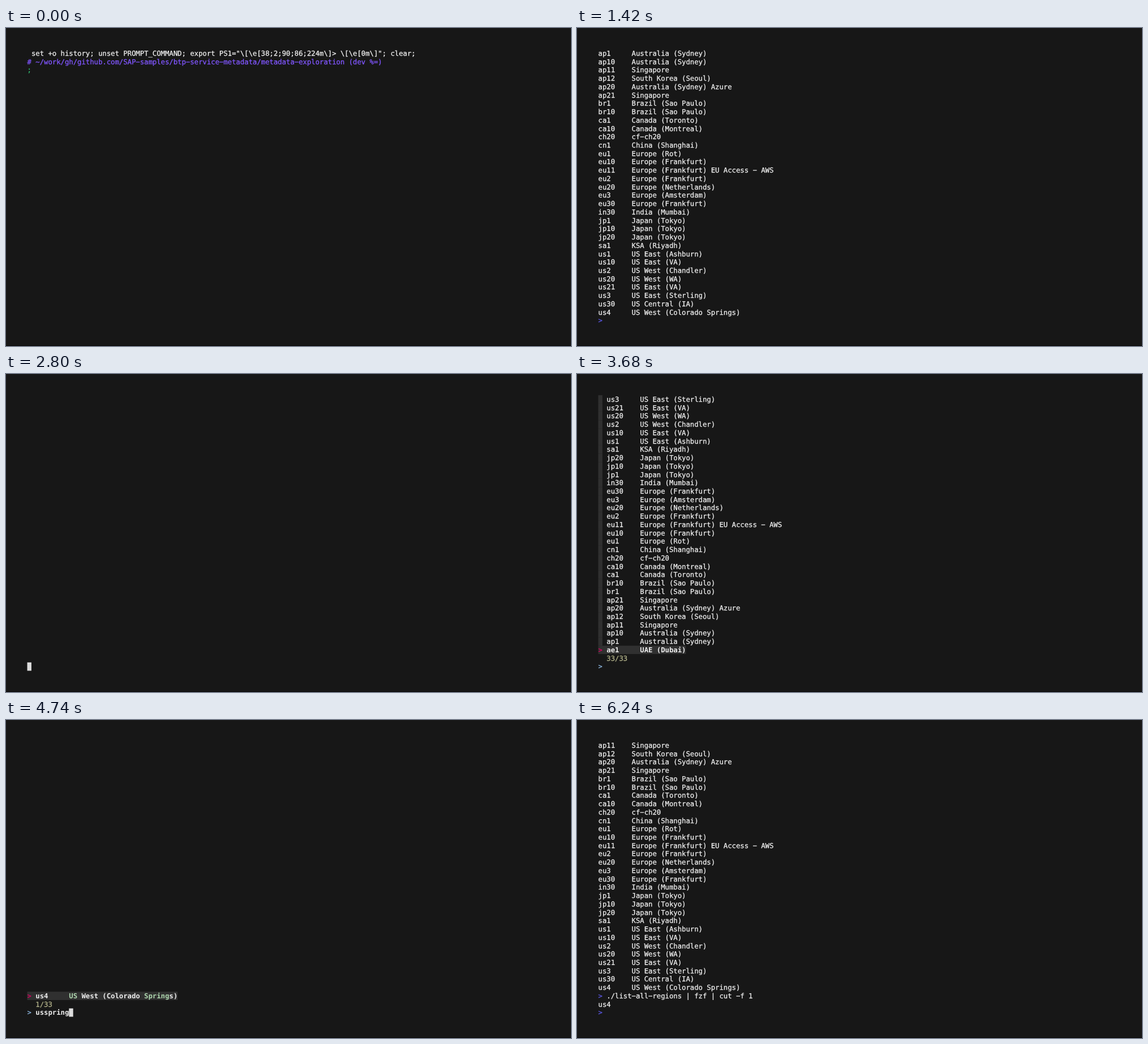
Recreate the animation shown at these times as an HTML page. Size 998 px wide and 561 px high, loop 6.32 s.

```html
<!DOCTYPE html>
<html lang="en">
<head>
<meta charset="utf-8">
<title>Region picker in a terminal</title>
<style>
  html, body { margin: 0; width: 100%; height: 100%; overflow: hidden; background: #171717; }
  svg { display: block; width: 998px; height: 561px; }
  text {
    font: 12.25px "DejaVu Sans Mono", monospace;
    font-variant-ligatures: none;
    text-rendering: geometricPrecision;
    white-space: pre;
    stroke-width: .3px;
  }
  .bold { font-weight: bold; stroke-width: 0; }
</style>
</head>
<body>
<svg viewBox="0 0 998 561">
  <rect width="998" height="561" fill="#171717"/>
  <g id="screen"></g>
  <rect y="560" width="998" height="1" fill="#000" opacity=".7"/>
</svg>
<script>
const LOOP = 6320, KEY = 11.15, BLINK = 93.33;
const CELL = 7.375, LINE = 14.73, LEFT = 37.5, TOP = 37.4, BASELINE = 11.6;
const ROWS = 33;
const FG = "#eeeeee", CURSOR = "#dddddd", PROMPT = "#5a56e0", BLUE = "#8056ff", GREEN = "#31bb71";
const FZF = {
  prompt: "#87afd7", pointer: "#d7005f", info: "#afaf87",
  hit: "#87af87", hitActive: "#afd7af", active: "#eeeeee", band: "#303030"
};

const regions = `ae1 UAE (Dubai)
ap1 Australia (Sydney)
ap10 Australia (Sydney)
ap11 Singapore
ap12 South Korea (Seoul)
ap20 Australia (Sydney) Azure
ap21 Singapore
br1 Brazil (Sao Paulo)
br10 Brazil (Sao Paulo)
ca1 Canada (Toronto)
ca10 Canada (Montreal)
ch20 cf-ch20
cn1 China (Shanghai)
eu1 Europe (Rot)
eu10 Europe (Frankfurt)
eu11 Europe (Frankfurt) EU Access - AWS
eu2 Europe (Frankfurt)
eu20 Europe (Netherlands)
eu3 Europe (Amsterdam)
eu30 Europe (Frankfurt)
in30 India (Mumbai)
jp1 Japan (Tokyo)
jp10 Japan (Tokyo)
jp20 Japan (Tokyo)
sa1 KSA (Riyadh)
us1 US East (Ashburn)
us10 US East (VA)
us2 US West (Chandler)
us20 US West (WA)
us21 US East (VA)
us3 US East (Sterling)
us30 US Central (IA)
us4 US West (Colorado Springs)`.split("\n").map(line => {
  const gap = line.indexOf(" ");
  return line.slice(0, gap).padEnd(8) + line.slice(gap + 1);
});

const listCommand = "./list-all-regions";
const pickCommand = "./list-all-regions | fzf | cut -f 1";
const setup = String.raw` set +o history; unset PROMPT_COMMAND; export PS1="\[\e[38;2;90;86;224m\]> \[\e[0m\]"; clear;`;
const folder = "# ~/work/gh/github.com/SAP-samples/btp-service-metadata/metadata-exploration (dev %=)";

// The cursor stays solid from the first time and blinks from the second.
const cursorPhases = [
  [20, 20], [284, 480], [920, 953], [1820, 2197],
  [2800, 2840], [3700, 3720], [4300, 4367], [4800, 4840]
];

let marks = [];

// The hyphen is drawn as wide as a minus sign, as in the terminal's typeface.
const escapeText = s => s.replace(/&/g, "&amp;").replace(/</g, "&lt;").replace(/-/g, "\u2212");

function put(col, row, text, color = FG, bold = false) {
  if (!text.trim()) return;
  const x = (LEFT + col * CELL).toFixed(2), y = (TOP + row * LINE + BASELINE).toFixed(2);
  marks.push(`<text x="${x}" y="${y}" fill="${color}" stroke="${color}"${bold ? ' class="bold"' : ""}>${escapeText(text)}</text>`);
}

function fill(col, row, cols, color) {
  marks.push(`<rect x="${LEFT + col * CELL}" y="${TOP + row * LINE}" width="${cols * CELL}" height="${LINE}" fill="${color}"/>`);
}

function cursor(col, row, t) {
  const [, start] = cursorPhases.filter(([from]) => from <= t).pop();
  if (Math.floor(Math.max(0, t - start) / BLINK) % 2 === 0) fill(col, row, 1, CURSOR);
}

const typed = (text, start, t) => text.slice(0, Math.max(0, Math.floor((t - start) / KEY) + 1));

const edgeBonus = before => before === undefined || before === " " ? 10 : before === "(" ? 8 : 0;

// Best fuzzy match: word starts and runs score higher, gaps cost points.
function match(text, query, from = 0, runBonus = 0) {
  if (!query) return { score: 0, hits: [] };
  let best = null;
  for (let p = text.indexOf(query[0], from); p >= 0; p = text.indexOf(query[0], p + 1)) {
    const gap = from ? p - from : 0;
    const chained = from > 0 && gap === 0;
    const edge = edgeBonus(text[p - 1]);
    const rest = match(text, query.slice(1), p + 1, chained ? runBonus : edge);
    if (!rest) continue;
    const bonus = chained ? Math.max(edge, runBonus, 4) : edge * (from ? 1 : 2);
    const score = 16 + bonus - (gap ? gap + 2 : 0) + rest.score;
    if (!best || score > best.score) best = { score, hits: [p, ...rest.hits] };
  }
  return best;
}

const searches = {};
function search(query) {
  return searches[query] ||= regions
    .map(text => ({ text, ...match(text.toLowerCase(), query) }))
    .filter(item => item.hits)
    .sort((a, b) => query ? b.score - a.score || a.text.length - b.text.length : 0);
}

function drawItem(item, row, active) {
  fill(0, row, active ? 2 + item.text.length : 1, FZF.band);
  if (active) put(0, row, ">", FZF.pointer, true);
  const base = active ? FZF.active : FG, lit = active ? FZF.hitActive : FZF.hit;
  const isHit = i => item.hits.includes(i);
  for (let i = 0, end; i < item.text.length; i = end) {
    end = i + 1;
    while (end < item.text.length && isHit(end) === isHit(i)) end++;
    const part = item.text.slice(i, end), lead = part.length - part.trimStart().length;
    put(2 + i + lead, row, part.trimStart(), isHit(i) ? lit : base, active);
  }
}

function drawFinder(t) {
  const last = ROWS - 1;
  if (t < 2820) return cursor(0, last, t);
  const query = t < 3700 ? "" : "us" + typed("spring", 4300, t);
  const found = t < 2840 ? [] : search(query);
  found.slice(0, last - 1).forEach((item, i) => drawItem(item, last - 2 - i, i === 0));
  put(2, last - 1, `${found.length}/${t < 2840 ? 0 : regions.length}`, FZF.info);
  put(0, last, ">", FZF.prompt, true);
  put(2, last, query, FZF.active, true);
  cursor(2 + query.length, last, t);
}

function shellLines(t) {
  const prompt = text => "> " + text;
  if (t < 920) return [prompt(typed(listCommand, 284, t))];
  const lines = [prompt(listCommand)];
  if (t < 953) return [...lines, ""];
  lines.push(...regions, prompt(typed(pickCommand, 1820, t)));
  if (t < 4800) return lines;
  if (t < 4820) return [...lines, ""];
  lines.push("us4");
  return [...lines, t < 4840 ? "" : prompt("")];
}

function drawShell(t) {
  const lines = shellLines(t).slice(-ROWS);
  lines.forEach((line, row) => {
    if (line.startsWith("> ")) {
      put(0, row, ">", PROMPT);
      put(2, row, line.slice(2));
    } else {
      put(0, row, line.slice(0, 8).trimEnd());
      put(8, row, line.slice(8));
    }
  });
  cursor(lines[lines.length - 1].length, lines.length - 1, t);
}

function drawSetup() {
  put(1, 0, setup.trimStart());
  put(0, 1, folder, BLUE);
  put(0, 2, ";", GREEN);
}

const screenGroup = document.getElementById("screen");
let shown = "";

function render(t) {
  marks = [];
  if (t < 20) drawSetup();
  else if (t >= 2800 && t < 4800) drawFinder(t);
  else drawShell(t);
  const markup = marks.join("");
  if (markup !== shown) screenGroup.innerHTML = shown = markup;
}

function tick() {
  render(performance.now() % LOOP);
  requestAnimationFrame(tick);
}

render(0);
requestAnimationFrame(tick);
</script>
</body>
</html>
```
